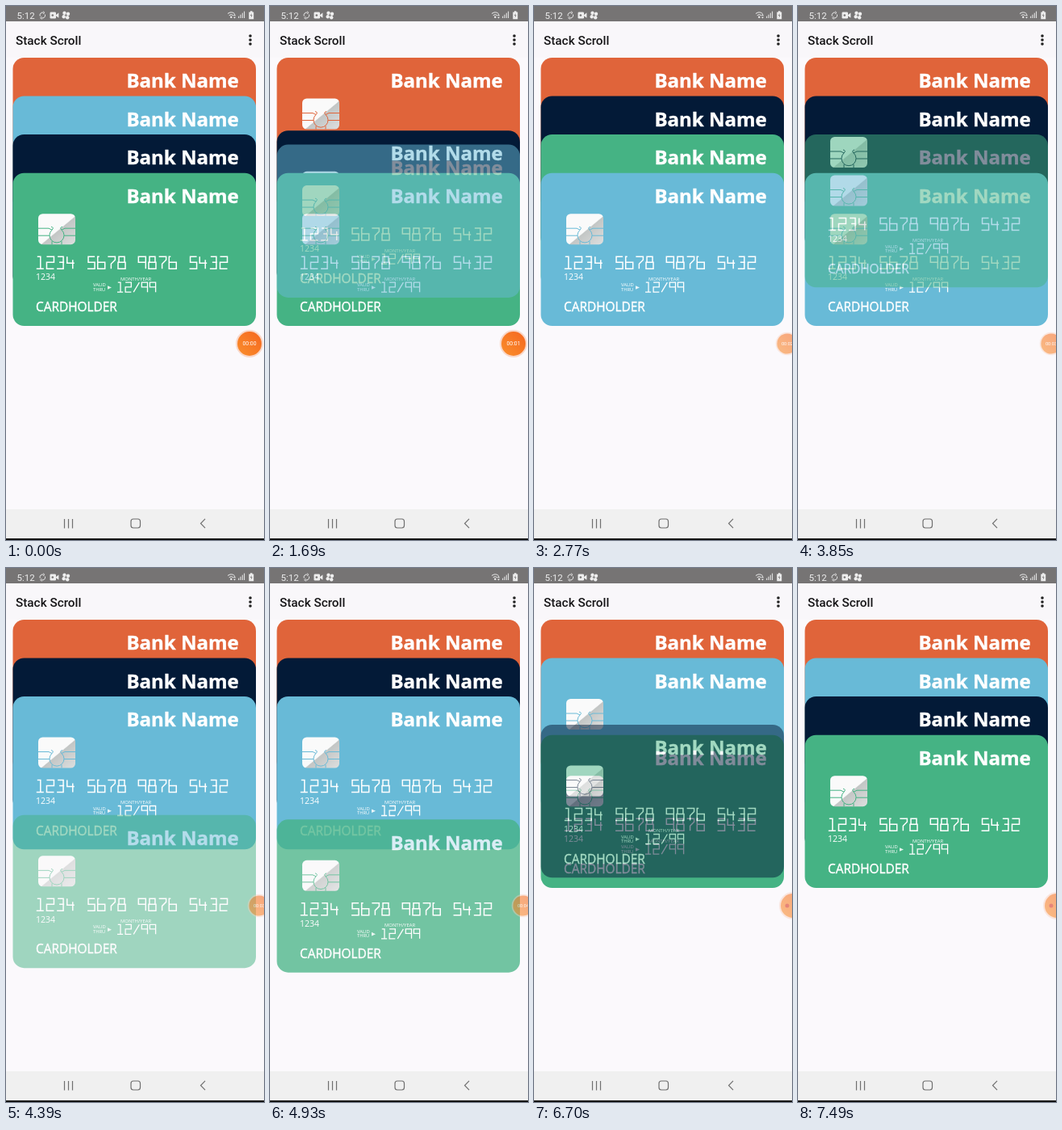
An HTML page that plays this animation: 320x661 px, repeating every 8 s.

```html
<!DOCTYPE html>
<html lang="en">
<head>
<meta charset="utf-8">
<title>Stack Scroll</title>
<style>
html, body { margin: 0; width: 100%; height: 100%; overflow: hidden; background: #fbf9fc; }
svg { display: block; width: 100%; height: 100%; }
text { font-family: "Open Sans", "Noto Sans", sans-serif; fill: #fff; }
.ui { font-family: Roboto, sans-serif; }
.line { fill: none; stroke: #fff; }
.thick { stroke: #fff; stroke-width: .4; }
</style>
</head>
<body>
<svg id="stage" viewBox="0 0 320 661">
  <defs>
    <linearGradient id="shine" x1="0" y1="0" x2="1" y2="1">
      <stop offset=".53" stop-color="#fafafa"/>
      <stop offset=".55" stop-color="#c3c6c5"/>
      <stop offset="1" stop-color="#dedfdf"/>
    </linearGradient>
    <linearGradient id="glow" x1="0" y1="1" x2="1" y2="0">
      <stop offset="0" stop-color="#fa8f2c"/>
      <stop offset="1" stop-color="#f5661f"/>
    </linearGradient>
  </defs>
  <rect width="320" height="661" fill="#fbf9fc"/>
  <rect y="19" width="320" height="45" fill="#f9f7fa"/>

  <!-- status bar -->
  <rect width="320" height="19" fill="#767474"/>
  <text class="ui" x="13.5" y="15.5" font-size="11.5" style="fill:#eee">5:12</text>
  <g fill="none" stroke="#eee" stroke-width="1">
    <path d="M42.2 12.5A3.4 3.4 0 0 1 46.5 8.2M48.4 10.5A3.4 3.4 0 0 1 44 14.8"/>
    <path d="M46 6.6l2 1.7-2 1.7M44.5 13l-2 1.7 2 1.7" stroke-width=".8"/>
    <path d="M275 9.5q4.3-3.4 8.6 0M276.7 11.6q2.6-2 5.2 0"/>
    <path d="M288.7 15v-2.4M291 15v-4.3M293.3 15v-6.4M295.6 15V6.6"/>
  </g>
  <g fill="#eee">
    <rect x="54.5" y="7.5" width="7.5" height="8" rx="1.3"/>
    <path d="M62 11l3.4-2.8v6.6L62 12.2z"/>
    <circle cx="57.8" cy="11.5" r="1.3" fill="#767474"/>
    <circle cx="72.5" cy="8.8" r="2.2"/><circle cx="77" cy="9.7" r="2.2"/>
    <circle cx="71.7" cy="13.2" r="2.2"/><circle cx="76.2" cy="14.2" r="2.2"/>
    <circle cx="279.3" cy="13.8" r="1.2"/>
    <path d="M282 12l1.5-2 1.5 2zm0 1.5h3l-1.5 2z"/>
    <path d="M303 6.3h2.5v1.2h1.7v8.7h-5.9V7.5h1.7z"/>
  </g>
  <path d="M304.8 9l-2 3h1.4l-.5 2.6 2-3.2h-1.4z" fill="#767474"/>

  <!-- title bar -->
  <text class="ui" x="12" y="47.5" font-size="15.3" font-weight="500" style="fill:#161517">Stack Scroll</text>
  <g fill="#222"><circle cx="303" cy="37" r="1.8"/><circle cx="303" cy="42" r="1.8"/><circle cx="303" cy="47" r="1.8"/></g>

  <g id="deck"></g>

  <g id="rec">
    <circle r="17" fill="#f8cdb8" opacity=".75"/>
    <circle r="15" fill="url(#glow)"/>
    <text id="clock" class="ui" y="2.3" font-size="6.8" text-anchor="middle">00:00</text>
    <circle id="dot" cx="-7" r="2.5" fill="#d8321c"/>
  </g>

  <!-- navigation bar -->
  <rect y="623" width="320" height="36" fill="#f0f0f0"/>
  <g fill="none" stroke="#6f6f6f" stroke-width="1.2">
    <path d="M72.5 635v11.5M77.5 635v11.5M82.5 635v11.5"/>
    <rect x="155" y="635" width="11.5" height="11" rx="3"/>
    <path d="M247 634.8l-5.5 5.7 5.5 5.7"/>
  </g>
  <rect y="659" width="320" height="2" fill="#151515"/>
</svg>
<script>
const LOOP = 8000;
const $ = id => document.getElementById(id);
const colors = { orange: '#e0643a', blue: '#68bad7', navy: '#031a37', green: '#45b384' };

const glyphs = {
  1: 'M1 0H5V15M0 15H9', 2: 'M0 0H9V7H0V15H9', 3: 'M1 0H8V15H0M3 7H9',
  4: 'M0 0V8H9M7 4V15', 5: 'M9 0H1V7H9V15H0', 6: 'M2 0H0V15H9V7H0',
  7: 'M0 0H9V4L4 9V15', 8: 'M1 0H8V7H1ZM0 7H9V15H0Z', 9: 'M9 7H0V0H9V15', '/': 'M9 0L0 15'
};

function digits(str, x, y, pitch, scale, weight) {
  const parts = [...str].map((c, i) => glyphs[c]
    ? `<path d="${glyphs[c]}" transform="translate(${x + i * pitch} ${y}) scale(${scale})"/>` : '');
  return `<g class="line" role="img" aria-label="${str}" stroke-width="${weight}">${parts.join('')}</g>`;
}

function makeCard(color) {
  const g = document.createElementNS('http://www.w3.org/2000/svg', 'g');
  g.innerHTML = `
    <rect x="8.5" width="301.5" height="189.3" rx="14" fill="${color}"/>
    <text class="thick" x="288.7" y="37.3" font-size="24" font-weight="700" text-anchor="end">Bank Name</text>
    <g transform="translate(40 50.5)">
      <rect width="46" height="38" rx="5.5" fill="url(#shine)"/>
      <path d="M16 16Q20 17 17 20A9 9 0 1 0 29 20Q26 17 30 16M0 18H13L17 20M29 20L33 18H46M0 27H14M32 27H46M17 34V38M29 34V38"
        fill="none" stroke="${color}" stroke-width="1"/>
    </g>
    ${digits('1234 5678 9876 5432', 37.8, 103.5, 12.65, 1, 1.5)}
    <text x="37" y="132.7" font-size="10.5">1234</text>
    <text x="142" y="133" font-size="5.9">MONTH/YEAR</text>
    <text x="108" y="140.5" font-size="5.8">VALID</text>
    <text x="108" y="146" font-size="5.8">THRU</text>
    <path d="M126 139.5l5 2.3-5 2.3z" fill="#fff" opacity=".85"/>
    ${digits('12/99', 138, 135.5, 10.1, .8, 1.6)}
    <text class="thick" x="37" y="171.5" font-size="15.4">CARDHOLDER</text>`;
  return g;
}

const cards = {};
for (const name in colors) cards[name] = makeCard(colors[name]);

const S = [64, 111.5, 159, 206.7];
const LOW = 416;

// [time, value] points, eased between neighbours
const tops = {
  orange: [[0, S[0]]],
  blue: [[1480, S[1]], [2200, LOW], [2282, LOW], [2482, S[3]],
    [4240, S[3]], [4385, S[2]], [6560, S[2]], [6700, S[1]]],
  navy: [[1660, S[2]], [1810, S[1]], [6480, S[1]], [6700, 194], [6840, 194], [7040, S[2]]],
  green: [[1745, S[3]], [1895, S[2]], [4110, S[2]], [4625, LOW], [4831, LOW], [5031, S[3]]]
};
const fades = {
  orange: [[0, 1]],
  blue: [[1120, 1], [1120, .5], [2282, .5], [2482, 1]],
  navy: [[6120, 1], [6120, .5], [6840, .5], [7040, 1]],
  green: [[3820, 1], [3820, .5], [4831, .5], [5031, 1]]
};
const layers = [
  [0, 'orange blue navy green'],
  [1120, 'orange navy green blue'],
  [3820, 'orange navy blue green'],
  [6120, 'orange blue green navy'],
  [7300, 'orange blue navy green']
];
const rec = {
  x: [[2000, 302], [2150, 314], [5510, 314], [5510, 321]],
  size: [[2000, 1], [2150, .84], [5510, .84], [5510, 1]],
  fade: [[2000, 1], [2150, .58]]
};
const ticks = [[0, 0], [1120, 1], [2230, 2], [3820, 3], [4930, 4]];

const stepAt = (list, t) => list.filter(p => p[0] <= t).pop()[1];

function valueAt(list, t) {
  const i = list.findIndex(p => p[0] > t);
  if (i === 0) return list[0][1];
  if (i < 0) return list[list.length - 1][1];
  const [t0, a] = list[i - 1], [t1, b] = list[i];
  return a + (b - a) * (.5 - Math.cos(Math.PI * (t - t0) / (t1 - t0)) / 2);
}

let shown = '';
function draw(t) {
  const order = stepAt(layers, t);
  if (order !== shown) {
    $('deck').append(...order.split(' ').map(n => cards[n]));
    shown = order;
  }
  for (const n in cards) {
    cards[n].setAttribute('transform', `translate(0 ${valueAt(tops[n], t)})`);
    cards[n].setAttribute('opacity', valueAt(fades[n], t));
  }
  $('rec').setAttribute('transform', `translate(${valueAt(rec.x, t)} 418) scale(${valueAt(rec.size, t)})`);
  $('rec').setAttribute('opacity', valueAt(rec.fade, t));
  const idle = t >= 5510;
  $('clock').textContent = idle ? '' : '00:0' + stepAt(ticks, t);
  $('dot').setAttribute('opacity', idle ? 1 : 0);
}

const start = performance.now();
function loop() {
  draw((performance.now() - start) % LOOP);
  requestAnimationFrame(loop);
}
loop();
</script>
</body>
</html>
```
